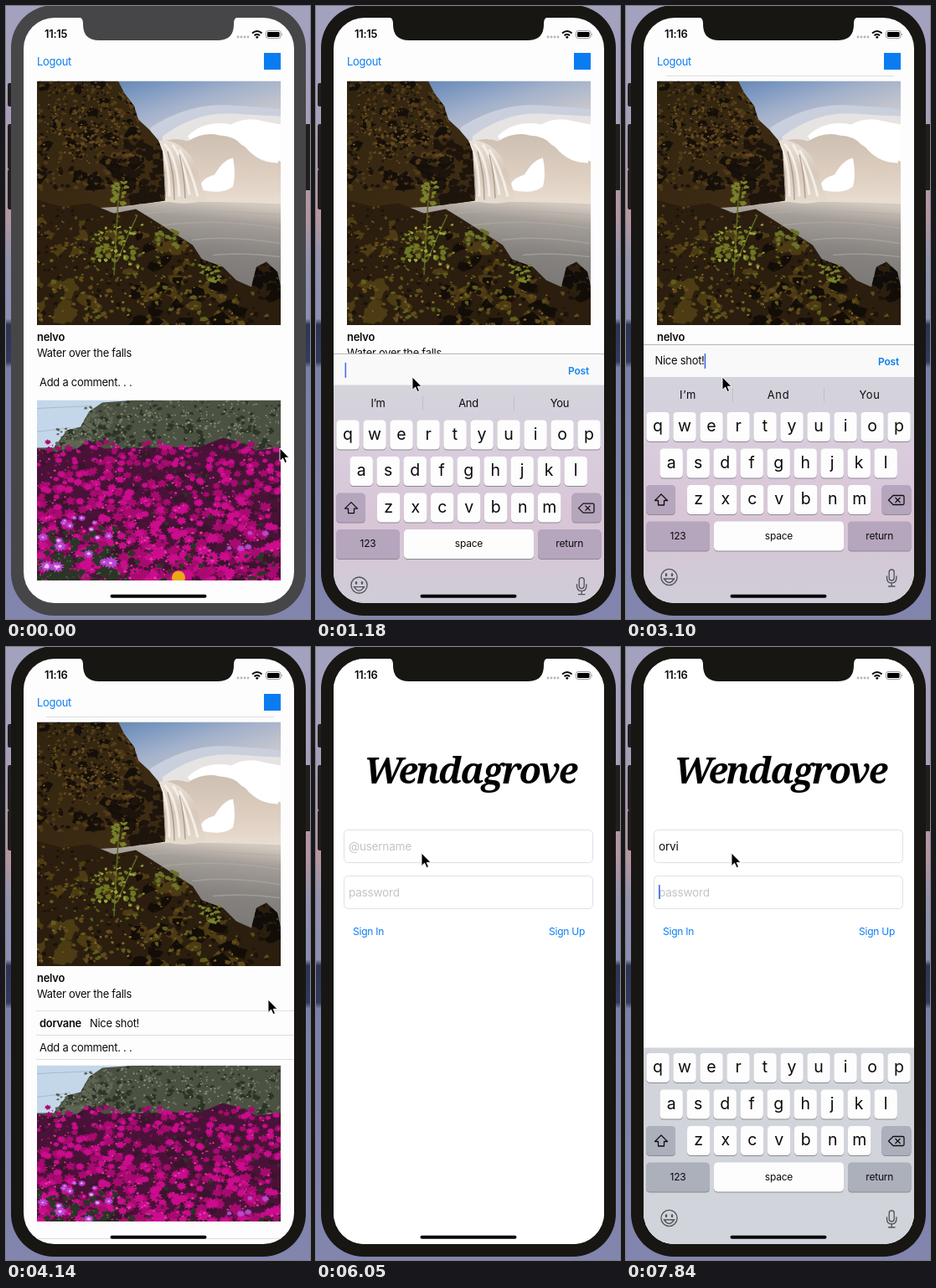
Recreate the animation shown at these times as an HTML page. Size 363 by 732 pixels, loop 8000 ms.

```html
<!DOCTYPE html>
<html lang="en">
<head>
<meta charset="utf-8">
<title>Photo feed</title>
<style>
html, body { margin: 0; width: 100%; height: 100%; overflow: hidden; background: #7b80a8; }
svg { display: block; width: 363px; height: 732px; }
text { font: 12.9px Inter, "Liberation Sans", sans-serif; letter-spacing: -.018em; white-space: pre; fill: #0b0b0b; }
.b { font-weight: 600; }
.blue { fill: #0a7cf0; }
.mid { text-anchor: middle; }
.sm { font-size: 12px; }
.field { font-size: 13.6px; }
.hint { fill: #c4c4c7; }
.key { font-size: 19.5px; letter-spacing: 0; }
.logo { font: italic 700 43px "Noto Serif", "Liberation Serif", serif; letter-spacing: -.05em; fill: #000; }
.line { stroke: #dededf; stroke-width: 1; fill: none; }
.icon { stroke: #111; stroke-width: 1.3; fill: none; stroke-linejoin: round; }
.grey { stroke: #55565b; stroke-width: 1.4; fill: none; stroke-linecap: round; }
</style>
</head>
<body>
<svg id="stage" viewBox="0 0 363 732" xmlns="http://www.w3.org/2000/svg">
<defs>
  <linearGradient id="wall" x2="0" y2="1">
    <stop offset="0" stop-color="#a2a2bf"/><stop offset=".2" stop-color="#a99db8"/>
    <stop offset=".34" stop-color="#b7959f"/><stop offset=".41" stop-color="#9292ae"/>
    <stop offset=".51" stop-color="#8a8eb2"/><stop offset=".52" stop-color="#2e3452"/>
    <stop offset=".58" stop-color="#333a5c"/><stop offset=".59" stop-color="#7b80a8"/>
    <stop offset="1" stop-color="#8285ad"/>
  </linearGradient>
  <linearGradient id="sky" x2=".3" y2="1">
    <stop offset="0" stop-color="#4f7094"/><stop offset=".14" stop-color="#7795bf"/>
    <stop offset=".25" stop-color="#a3b1cb"/><stop offset=".36" stop-color="#c3c5cd"/><stop offset=".55" stop-color="#e5d9cd"/>
  </linearGradient>
  <linearGradient id="haze" x2="0" y2="1">
    <stop offset="0" stop-color="#cdbfb1"/><stop offset=".6" stop-color="#dfd0c2"/><stop offset="1" stop-color="#ebe0d5"/>
  </linearGradient>
  <linearGradient id="sea" x1=".7" x2=".5" y2="1">
    <stop offset="0" stop-color="#d2c8be"/><stop offset=".18" stop-color="#a49e98"/>
    <stop offset=".5" stop-color="#85827f"/><stop offset="1" stop-color="#757371"/>
  </linearGradient>
  <linearGradient id="fall" x2="0" y2="1">
    <stop offset="0" stop-color="#e9e0d6"/><stop offset=".5" stop-color="#d6c8ba"/><stop offset="1" stop-color="#e6dccf"/>
  </linearGradient>
  <linearGradient id="face" x2=".8" y2="1">
    <stop offset="0" stop-color="#30240f"/><stop offset=".45" stop-color="#3d2b13"/><stop offset="1" stop-color="#1d140c"/>
  </linearGradient>
  <linearGradient id="warm" x2="0" y2="1">
    <stop offset="0" stop-color="#d3d4dc"/><stop offset=".3" stop-color="#d9ccdc"/>
    <stop offset=".6" stop-color="#d8c5d6"/><stop offset=".85" stop-color="#d1cbd7"/>
    <stop offset="1" stop-color="#cfd0d8"/>
  </linearGradient>
  <clipPath id="screen"><rect x="21" y="14" width="323" height="699" rx="37"/></clipPath>
  <clipPath id="shot"><rect width="291" height="291.5"/></clipPath>
  <clipPath id="cliff"><path d="M0 0H97L104 14 116 30 121 46 134 58 145 71 150 84 153 143 100 150 0 156Z"/></clipPath>
  <clipPath id="rocks"><path d="M0 142L30 150 62 146 92 158 118 153 136 164 158 178 186 196 197 213 222 222 238 238 256 246 262 222 274 216 287 228 291 246V292H0Z"/></clipPath>
  <clipPath id="bush"><path d="M20 57L36 36 52 32 62 14 78 3 120 0H291V90H0V57Z"/></clipPath>
  <clipPath id="bed"><path d="M0 58L25 62 48 58 62 48 80 58 195 56 222 45 240 50 262 60 291 57V292H0Z"/></clipPath>
  <clipPath id="page"><rect x="21" y="80" width="323" height="606"/></clipPath>
</defs>
<rect width="363" height="732" fill="url(#wall)"/>
<path fill="#211f1d" d="M4 92H8V120H4Q2 120 2 117V95Q2 92 4 92M4 141H8V195H4Q2 195 2 192V144Q2 141 4 141M4 195H8V243H4Q2 243 2 240V198Q2 195 4 195M356 141H363V220H356Z"/>
<rect id="body" x="6" y="-1" width="352" height="729" rx="51"/>
<g clip-path="url(#screen)">
  <rect x="21" y="14" width="323" height="700" fill="#fdfdfd"/>
  <g id="feed">
    <text id="logout" class="blue" x="37" y="71">Logout</text>
    <rect x="308" y="56" width="20" height="20" fill="#0a7cf0"/>
    <path id="rule" class="line" d="M48 83.5H320"/>
    <g transform="translate(37 89.5)" clip-path="url(#shot)" id="falls">
      <rect width="291" height="292" fill="url(#sky)"/>
      <path fill="#c9cfdc" d="M135 56Q180 26 230 29T291 34V80H140Z"/>
      <path fill="#e6e3e3" d="M150 66Q190 36 235 39T291 42V90H150Z"/>
      <path fill="#fff" d="M180 66Q200 46 232 52 250 42 270 48L291 52V100H200Z"/>
      <path fill="url(#haze)" d="M145 74Q166 66 180 72 200 60 218 65 236 66 244 76 262 88 291 96V152H145Z"/>
      <path fill="#fff" d="M244 72Q266 66 288 70V98Q260 98 244 72M234 92Q238 112 234 126 222 136 196 130 192 118 212 112 222 94 234 92Z"/>
      <path fill="url(#sea)" d="M60 148Q180 141 291 147V262H60Z"/>
      <path fill="none" stroke="#b3aca5" stroke-width="1.500" opacity=".6" d="M120 160Q180 150 290 160M150 172Q220 164 290 176M185 190Q230 184 290 194M210 208Q250 204 290 210"/>
      <path fill="url(#fall)" d="M142 72Q160 68 174 80 190 92 194 116L202 142Q176 150 153 143L150 90Z"/>
      <path fill="none" stroke="#fbf6f0" stroke-width="3" opacity=".8" d="M146 76Q158 92 158 138M152 75Q168 92 170 138M162 76Q176 96 182 136M170 82Q184 104 192 138"/>
      <path fill="none" stroke="#8d7c6c" stroke-width="1.500" opacity=".6" d="M146 78Q153 100 153 140M156 84Q164 110 164 142M170 88Q176 110 177 140"/>
    </g>
    <text class="b" x="37" y="400">nelvo</text>
    <text x="37" y="419">Water over the falls</text>
    <g id="comment">
      <path class="line" d="M36 434.5H344M36 463.5H344M36 492.5H344M21 706.5H344"/>
      <text class="b" x="40" y="454">dorvane</text>
      <text x="100" y="454">Nice shot!</text>
    </g>
    <g clip-path="url(#page)"><g id="below">
      <text x="40" y="454">Add a comment. . .</text>
      <g transform="translate(37 470.5)" clip-path="url(#shot)" id="garden">
        <rect width="291" height="292" fill="#c4d7ea"/>
        <path stroke="#aab9c8" fill="none" d="M0 10L65 7M0 38L40 33"/>
      </g>
    </g></g>
  </g>
  <g id="login">
    <rect x="21" y="14" width="323" height="700" fill="#fff"/>
    <text class="logo mid" x="184" y="163">Wendagrove</text>
    <g fill="#fff" stroke="#e0e0e2"><rect x="33.5" y="218.5" width="297" height="39" rx="5"/><rect x="33.5" y="273.5" width="297" height="39" rx="5"/></g>
    <text id="user" class="field" x="39" y="243"></text>
    <text class="field hint" x="39" y="297.5">password</text>
    <text class="blue sm" x="44" y="344">Sign In</text>
    <text class="blue sm" x="278" y="344">Sign Up</text>
    <rect id="loginCaret" width="1.6" height="17" fill="#3d6be0"/>
  </g>
  <g id="bar">
    <rect id="barBack" x="21" y="404" width="323" fill="#f9f9fa"/>
    <path class="line" style="stroke:#b4b4b8" d="M21 404.5H344"/>
    <g id="barText">
      <text id="draft" x="34.5" y="428"></text>
      <rect id="draftCaret" y="415" width="1.6" height="18" fill="#3d6be0"/>
      <text class="b blue sm" x="301" y="429">Post</text>
    </g>
  </g>
  <g id="board">
    <rect id="boardBack" x="21" y="443" width="323" height="290"/>
    <g id="hints">
      <path class="line" style="stroke:#bfbfca" d="M127.5 456V473M236.5 456V473"/>
      <g id="words" class="mid"><text x="74" y="469">I’m</text><text x="182" y="469">And</text><text x="291" y="469">You</text></g>
    </g>
    <g id="keys"></g>
    <path class="icon" d="M42 583l7.5 7.5h-4v5.5h-7v-5.5h-4zM319 584.5h11.5q1.5 0 1.5 1.5v8q0 1.5-1.5 1.5H319l-5.5-5.5zM321.5 587l6 6m0-6l-6 6"/>
    <g class="grey">
      <circle cx="51.5" cy="682" r="9.6"/><path d="M45.5 684Q51.5 693 57.5 684Z"/>
      <path stroke-width="2.4" d="M48 678.5v1.5M55 678.5v1.5"/>
      <rect x="314.2" y="673" width="6" height="13" rx="3"/><path d="M311.5 681v2q0 6 5.7 6t5.7-6v-2M317.2 689v4M313.5 693h7.5"/>
    </g>
  </g>
  <rect x="124.5" y="702.8" width="115" height="4" rx="2" fill="#050505"/>
</g>
<path id="notch" d="M86 13Q92 14 92 20V22Q92 41 111 41H253Q272 41 272 22V20Q272 14 278 13Z"/>
<text id="clock" class="b" x="46" y="38"></text>
<g fill="#b6b6b8"><circle cx="277" cy="37" r="1.4"/><circle cx="281" cy="37" r="1.4"/><circle cx="285" cy="37" r="1.4"/><circle cx="289" cy="37" r="1.4"/></g>
<path fill="none" stroke="#0b0b0b" stroke-width="2" d="M294 32.5q5.8-5 11.6 0M296.5 35.3q3.3-2.8 6.6 0"/>
<circle cx="299.8" cy="37.3" r="1.4"/>
<rect x="310.5" y="29.5" width="17.5" height="9" rx="2.5" fill="none" stroke="#99999b"/><rect x="312" y="31" width="14.5" height="6" rx="1.3"/><path fill="#99999b" d="M329 32.5q2 1.5 0 3z"/>
<path id="mouse" d="M0 0V15.5L3.6 12.1 6 17.6 8.5 16.5 6.2 11.3H11Z" fill="#000" stroke="#fff" stroke-width=".9"/>
</svg>
<script>
const NS = 'http://www.w3.org/2000/svg';
const $ = id => document.getElementById(id);
const LOOP = 8000, STEP = 147.7;

function add(parent, tag, attrs, text) {
  const el = document.createElementNS(NS, tag);
  for (const name in attrs) el.setAttribute(name, attrs[name]);
  if (text) el.textContent = text;
  return parent.appendChild(el);
}

let seed = 7;
function rand(a = 0, b = 1) {
  seed = (seed * 16807) % 2147483647;
  return a + (b - a) * seed / 2147483647;
}

// Scatter n ragged shapes in a box; their radius grows from r0 at the top to r1 at the bottom.
function scatter(parent, fill, n, [x0, y0, x1, y1], r0, r1, corners = 5, spiky = false) {
  let d = '';
  for (let i = 0; i < n; i++) {
    const v = rand(), x = rand(x0, x1), y = y0 + v * (y1 - y0);
    const r = (r0 + (r1 - r0) * v) * rand(.7, 1.3);
    for (let j = 0; j < corners; j++) {
      const a = j / corners * Math.PI * 2 + rand(0, .3);
      const m = spiky ? (j % 2 ? .6 : 1) * r : r * rand(.4, 1.2);
      d += (j ? 'L' : 'M') + (x + Math.cos(a) * m).toFixed(1) + ' ' + (y + Math.sin(a) * m * .8).toFixed(1);
    }
    d += 'Z';
  }
  add(parent, 'path', { fill, d });
}

function masked(parent, clip, fill) {
  const g = add(parent, 'g', { 'clip-path': `url(#${clip})` });
  add(g, 'rect', { width: 291, height: 292, fill });
  return g;
}

function paintFalls() {
  const cliff = masked($('falls'), 'cliff', 'url(#face)'), face = [0, 0, 125, 130];
  scatter(cliff, '#150f09', 26, face, 8, 13, 8);
  scatter(cliff, '#503a17', 170, face, 3, 4);
  scatter(cliff, '#664a1e', 150, [20, 0, 122, 90], 1.5, 2.5);
  scatter(cliff, '#1a120a', 170, face, 2, 4);
  scatter(cliff, '#8a6a33', 70, [0, 20, 100, 100], 1, 1.3);
  scatter(cliff, '#1d140c', 70, [105, 70, 153, 150], 5, 8);
  const rocks = masked($('falls'), 'rocks', '#2b1e0e'), ground = [0, 142, 291, 292];
  scatter(rocks, '#4c3b13', 50, [0, 160, 250, 292], 7, 12, 9);
  scatter(rocks, '#130d08', 45, [110, 165, 291, 292], 5, 12, 7);
  scatter(rocks, '#5f4a1a', 190, ground, 2, 4);
  scatter(rocks, '#1b120a', 170, ground, 2, 4);
  scatter(rocks, '#8a6c28', 90, [0, 165, 240, 285], 1, 2);
  scatter(rocks, '#5c5f1c', 60, [10, 185, 200, 285], 2, 4);
  scatter(rocks, '#100c0a', 14, [258, 224, 291, 246], 5, 7);
  const plants = add($('falls'), 'g', {});
  add(plants, 'path', { d: 'M98 128Q95 170 92 232M120 160Q108 185 96 215', stroke: '#5d671f', 'stroke-width': 1.5, fill: 'none' });
  scatter(plants, '#77802a', 24, [88, 120, 108, 148], 3, 4, 7);
  scatter(plants, '#6c7722', 50, [66, 178, 118, 214], 3, 4);
  scatter(plants, '#99a43b', 24, [72, 165, 128, 225], 2, 3);
  scatter(plants, '#75822a', 24, [194, 220, 218, 243], 3, 3);
  scatter(plants, '#697429', 20, [142, 178, 172, 198], 3, 3);
}

function paintGarden() {
  const garden = $('garden');
  const bush = masked(garden, 'bush', '#4b5242'), top = [15, 0, 291, 65];
  scatter(bush, '#2c3327', 200, top, 2, 6);
  scatter(bush, '#79806c', 260, top, 1.5, 2);
  scatter(bush, '#a0a58f', 130, [15, 0, 291, 45], 1, 1.3);
  scatter(garden, '#5e6653', 60, [24, 34, 66, 58], 2, 4);
  scatter(garden, '#5e6653', 30, [56, 8, 90, 34], 2, 4);
  const bed = masked(garden, 'bed', '#4a1238');

  // Overlapping rows: shadow first, then blossoms and their light tips.
  for (let y = 54; y < 225; y += 12) {
    const row = [0, y - 4, 291, y + 9], r = 3 + y / 34;
    scatter(bed, '#3a142c', 10, row, r, r * 1.3, 8);
    scatter(garden, '#a80a70', 20, row, r, r, 14, true);
    scatter(garden, '#cb0c8d', 17, row, r * .8, r, 18, true);
    scatter(garden, '#7c0d56', 14, [0, y + 5, 291, y + 12], r * .4, r * .5, 9);
    scatter(garden, '#e637a8', 22, row, 1, r * .35, 8, true);
    scatter(garden, '#2b3424', 5, [0, y + 6, 291, y + 13], 2, r * .6, 7);
  }
  scatter(garden, '#2b3527', 60, [0, 152, 95, 220], 5, 9, 8);
  scatter(garden, '#2d3627', 30, [85, 180, 291, 222], 3, 6, 8);
  scatter(garden, '#56614b', 110, [0, 150, 110, 220], 1, 2);
  for (let i = 0; i < 17; i++) {
    const x = rand(0, 92), y = rand(138, 200), spot = [x, y, x, y], r = 4 + (y - 138) / 14;
    scatter(garden, '#bd45d6', 1, spot, r, r, 22, true);
    scatter(garden, '#f0b9e6', 1, spot, r * .35, r * .35, 8);
  }
  scatter(garden, '#b848d0', 5, [225, 155, 275, 195], 4, 6, 20, true);
  add(garden, 'circle', { cx: 169, cy: 212, r: 8, fill: '#eaa817' });
}

function key(x, y, w, label, kind = '') {
  add($('keys'), 'rect', { x, y: y + 1, width: w, height: 35, rx: 4.5, fill: '#8b8992' });
  add($('keys'), 'rect', { x, y, width: w, height: 35, rx: 4.5, fill: '#fdfdfe', class: kind });
  const small = label.length > 1;
  add($('keys'), 'text', { x: x + w / 2, y: y + (small ? 21 : 23), class: 'mid ' + (small ? 'sm' : 'key') }, label);
}

function buildKeys() {
  [['qwertyuiop', 24.3, 485], ['asdfghjkl', 40.4, 528.5], ['zxcvbnm', 73, 572]].forEach(([row, x, y]) =>
    [...row].forEach((c, i) => key(x + i * 32, y, 27.5, c)));
  key(24, 572, 35, '', 'dim');
  key(305.5, 572, 35, '', 'dim');
  key(24, 615.5, 76, '123', 'dim');
  key(105, 615.5, 155, 'space');
  key(265, 615.5, 75.5, 'return', 'dim');
}

const set = (id, name, value) => $(id).setAttribute(name, value);
const show = (id, on) => set(id, 'display', on ? 'inline' : 'none');
const clamp = v => Math.max(0, Math.min(1, v));
const ease = v => v < .5 ? 4 * v ** 3 : 1 - (2 - 2 * v) ** 3 / 2;

// Critically damped spring going from 0 to 1.
function spring(ms) {
  const v = Math.max(0, ms) * .015;
  return 1 - (1 + v) * Math.exp(-v);
}

// start, end, x, y
const moves = [[60, 600, 115, 443], [3200, 3530, 313, 421], [4250, 4720, 57, 61], [5420, 5900, 126, 246]];
function mouseAt(t) {
  let x = 327, y = 528;
  for (const [a, b, tx, ty] of moves) {
    const p = ease(clamp((t - a) / (b - a)));
    x += (tx - x) * p;
    y += (ty - y) * p;
  }
  return `translate(${x.toFixed(1)} ${y.toFixed(1)})`;
}

function render(time) {
  const step = Math.floor((time + 10) / STEP), t = step * STEP;
  const login = step >= 37, secret = step >= 53, posted = step >= 27;
  const shell = step >= 4 ? '#171613' : '#464648';
  set('body', 'fill', shell);
  set('notch', 'fill', shell);
  set('mouse', 'transform', mouseAt(t));
  $('clock').textContent = step >= 18 ? '11:16' : '11:15';

  show('feed', !login);
  show('login', login);
  show('rule', step >= 18);
  show('comment', posted);
  set('below', 'transform', `translate(0 ${posted ? 29 : 0})`);
  set('logout', 'opacity', step === 33 ? .25 : step === 34 ? .6 : 1);

  const up = login ? spring(t - 6300) : spring(t - 833) * (1 - spring(t - 3600));
  const raised = up > .99 ? 1 : up;
  const top = 732 - 289 * raised, barTop = top - 39 * raised;
  show('board', raised > .01);
  set('board', 'transform', `translate(0 ${(top - 443).toFixed(1)})`);
  set('boardBack', 'fill', login || raised < .5 ? '#d1d4da' : 'url(#warm)');
  set('boardBack', 'y', secret ? 478.5 : 443);
  show('hints', !login);
  set('words', 'opacity', clamp(raised * 1.5 - .23));
  for (const w of $('words').children) w.style.letterSpacing = step >= 18 ? '.05em' : '';
  for (const k of document.querySelectorAll('.dim')) k.setAttribute('fill', login ? '#abb0bb' : '#b5a5bd');

  show('bar', !login && raised > .01);
  set('bar', 'transform', `translate(0 ${(barTop - 404).toFixed(1)})`);
  set('barBack', 'height', 39 * raised + .5);
  set('barText', 'opacity', clamp(raised * 2 - 1));
  $('draft').textContent = step < 25 ? 'Nice shot!'.slice(0, Math.max(0, step - 11)) : '';
  set('draftCaret', 'x', 34.5 + $('draft').getComputedTextLength());

  const count = step >= 51 ? 4 : step >= 50 ? 3 : step >= 49 ? 2 : step >= 47 ? 1 : 0;
  $('user').textContent = count ? 'orvi'.slice(0, count) : '@username';
  $('user').setAttribute('class', count ? 'field' : 'field hint');
  show('loginCaret', step >= 43);
  set('loginCaret', 'x', count && !secret && login ? 39.5 + $('user').getComputedTextLength() : 39);
  set('loginCaret', 'y', secret ? 284 : 229.5);
}

paintFalls();
paintGarden();
buildKeys();
const start = performance.now();
function tick() {
  render((performance.now() - start) % LOOP);
  requestAnimationFrame(tick);
}
tick();
</script>
</body>
</html>
```
